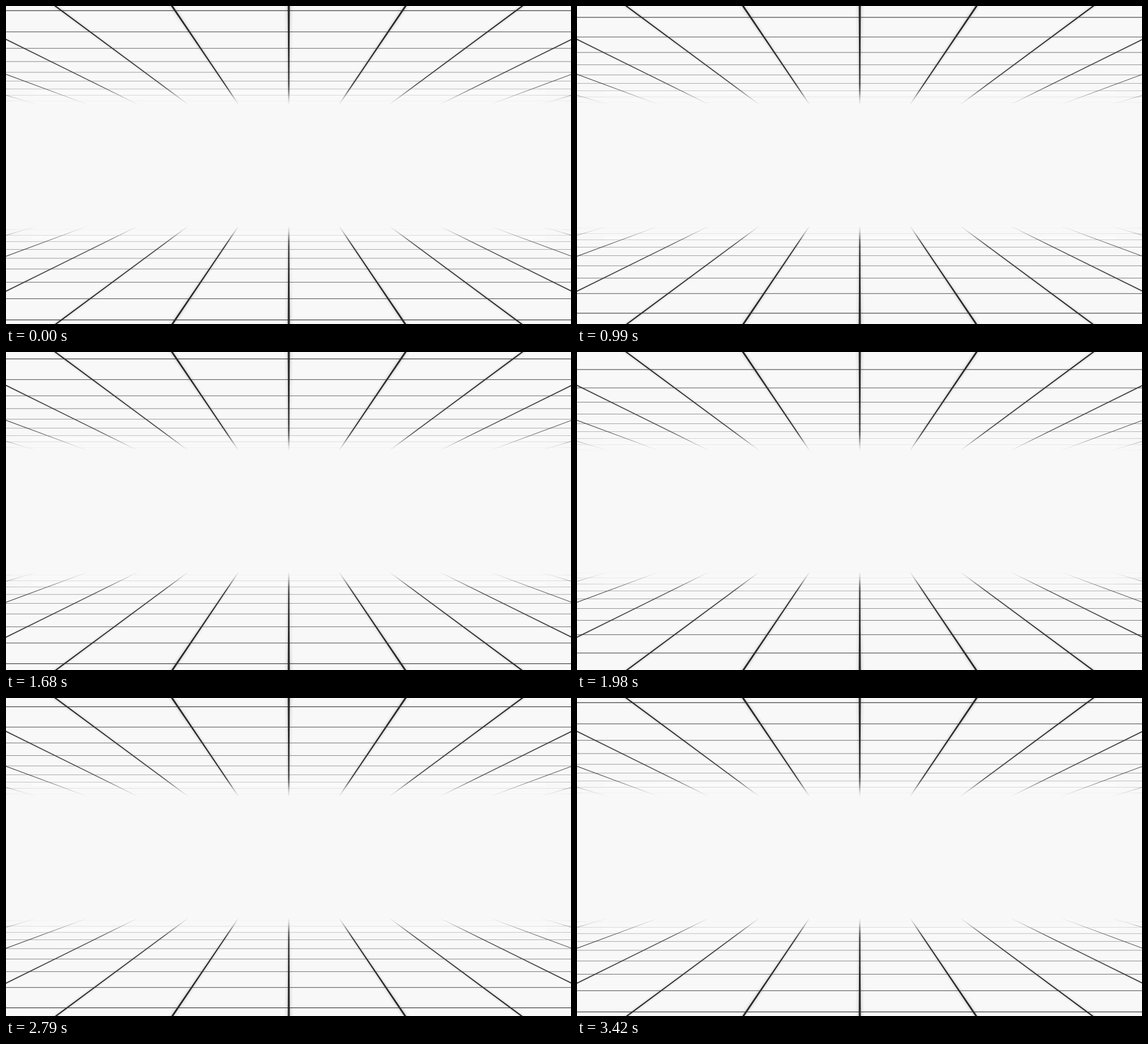
Recreate the animation shown at these times as an HTML page with a canvas. Size 998 by 561 pixels, loop 3.51 s.

```html
<!DOCTYPE html>
<html lang="en">
<head>
<meta charset="utf-8">
<title>Perspective grid</title>
<style>
  html, body { margin: 0; width: 100%; height: 100%; overflow: hidden; background: #f8f8f8; }
  body { position: relative; }
  canvas { display: block; }
  .haze {
    position: absolute; left: 0; top: 173px; width: 998px; height: 216px;
    background: #f8f8f8;
    box-shadow: 0 0 30px #f8f8f8, 0 0 30px #f8f8f8, 0 0 30px #f8f8f8, 0 0 30px #f8f8f8;
  }
</style>
</head>
<body>
<canvas width="998" height="561"></canvas>
<div class="haze"></div>
<script>
const W = 998, H = 561, CX = 499.5;
const MIRROR = 562;        // floor is the ceiling flipped about half this height
const HORIZON = 305.2;     // vanishing height of the ceiling plane
const EDGE = 174;          // far end of the plane
const CELL = 206.3;        // column spacing at the stage edge
const ROW0 = 3.367e-3, ROW_STEP = 0.4865e-3;   // rows are even in 1 / depth
const LOOP = 3510, STEP = 30, LAST = 3420, SPEED = 0.00173;
const INK = '42,42,42';

const ctx = document.querySelector('canvas').getContext('2d');

function column(i, width, alpha) {
  const far = (HORIZON - EDGE) / HORIZON;
  const near = (HORIZON + 1) / HORIZON;
  const left = i * CELL - width / 2, right = left + width;
  ctx.fillStyle = `rgba(${INK},${alpha})`;
  ctx.beginPath();
  ctx.moveTo(CX + left * near, -1);
  ctx.lineTo(CX + right * near, -1);
  ctx.lineTo(CX + right * far, EDGE);
  ctx.lineTo(CX + left * far, EDGE);
  ctx.fill();
}

function plane(phase) {
  for (let i = -5; i <= 5; i++) {
    column(i, 15, 0.035);
    column(i, 9, 0.06);
    column(i, 3.8, 1);
  }
  ctx.fillStyle = `rgb(${INK})`;
  for (let k = -1; k < 11; k++) {
    const depth = 1 / (ROW0 + (k - phase) * ROW_STEP);
    const y = HORIZON - depth;
    const thick = 1.15 * (depth / 297) ** 2;
    if (y > -2 && y < EDGE) ctx.fillRect(0, y - thick / 2, W, thick);
  }
}

function phaseAt(time) {
  const t = Math.floor(time % LOOP / STEP) * STEP;
  return t < 2 * STEP || t >= LAST ? 0 : t * SPEED % 1;
}

function draw(time) {
  const phase = phaseAt(time);
  ctx.setTransform(1, 0, 0, 1, 0, 0);
  ctx.fillStyle = '#f8f8f8';
  ctx.fillRect(0, 0, W, H);
  plane(phase);
  ctx.setTransform(1, 0, 0, -1, 0, MIRROR);
  plane(phase);
}

const start = performance.now();
function tick() {
  draw(performance.now() - start);
  requestAnimationFrame(tick);
}
tick();
</script>
</body>
</html>
```
